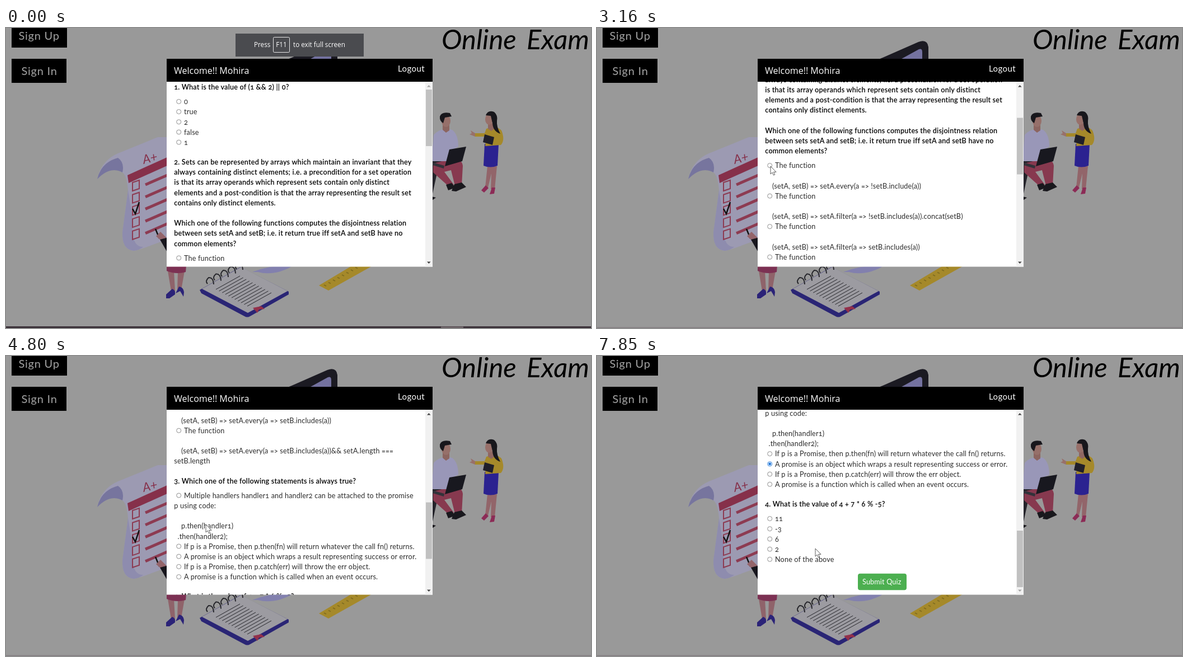
Recreate the animation shown at these times as an HTML page. Size 1045x536 px, loop 8000 ms.

```html
<!DOCTYPE html>
<html lang="en">
<head>
<meta charset="utf-8">
<title>Online Exam</title>
<style>
html, body { margin: 0; height: 100%; overflow: hidden; background: #999; }
svg { display: block; }
#stage { width: 100vw; height: 100vh; }
text { font-family: Lato, sans-serif; white-space: pre; }
.menu { font-size: 20px; letter-spacing: .75px; fill: #a2a2a2; }
.title { font-size: 49px; font-style: italic; }
.ui { font-family: "Open Sans", "Noto Sans", sans-serif; fill: #fff; }
.line { font-size: 12.6px; letter-spacing: .18px; fill: #2b2b2b; font-variant-numeric: oldstyle-nums; }
.q { font-weight: 600; letter-spacing: .22px; fill: #000; }
</style>
</head>
<body>
<svg id="stage" viewBox="0 0 1045 536" preserveAspectRatio="none">
  <rect width="1045" height="536" fill="#999"/>

  <!-- monitor corner -->
  <path d="M494 60L574 25Q590 19 592 34V60Z" fill="#1b1a22"/>
  <path d="M535 60L575 38Q581 36 581 43V60Z" fill="#7472a0"/>

  <!-- exam paper -->
  <path d="M290 195H271L200 224Q170 237 163 270Q185 245 208 258Q216 264 218 290L208 365Q207 396 228 398Q238 397 260 388L290 377Z" fill="#9c9ab2"/>
  <path d="M163 270Q170 240 200 232Q212 240 208 258Q186 246 163 270Z" fill="#77759e"/>
  <path d="M208 365Q207 396 228 398Q238 397 245 391Q222 392 226 340L218 290Z" fill="#8e8cae"/>
  <path d="M217 263L290 230V245L219 277Z" fill="#86304a"/>
  <text x="246" y="243" transform="rotate(-14 246 243)" font-size="22" font-style="italic" fill="#86304a">A+</text>
  <g id="rows" fill="none" stroke="#8d3b52"></g>
  <path d="M226 323L231 332L238 311" fill="none" stroke="#111" stroke-width="2.5"/>
  <path d="M267 359L274 376" stroke="#111" stroke-width="2.5"/>
  <path d="M268 372L276 364L290 378V391Z" fill="#94646a"/>
  <path d="M275 378L290 374V404Z" fill="#17161d"/>

  <!-- legs -->
  <path d="M289 434H300L302 470H295ZM307 434H319L313 468H306Z" fill="#8f636a"/>
  <path d="M287 424H322L321 436Q304 441 287 434Z" fill="#7c3153"/>
  <path d="M286 476L297 466Q303 468 302 476L292 483H286ZM303 474L309 462Q317 463 318 472L317 480L311 470Z" fill="#2b2378"/>

  <!-- notebook -->
  <path d="M440 436Q470 424 505 424Q520 424 490 435Q468 441 450 436Z" fill="#8280ae"/>
  <path d="M346 468L419 427L505 471V476L436 515Q431 518 426 515L349 474Z" fill="#2a2575"/>
  <path d="M350 466L420 427L503 470L432 509Z" fill="#9c9ba1"/>
  <path d="M441 500L456 497L462 502L452 503L449 509Z" fill="#93304a"/>
  <g id="book" fill="none" stroke="#26262b"></g>

  <!-- ruler -->
  <path d="M559 460L621 423H658L576 469Z" fill="#a5892a"/>
  <g id="ticks" stroke="#7d6a20"></g>

  <!-- seated figure -->
  <path d="M755 232H782L772 250L762 296H755Z" fill="#25242b"/>
  <path d="M760 301L768 303L761 308Z" fill="#17161b"/>
  <path d="M763 242L795 234Q814 232 816 246L814 282H802L795 254L783 257L800 280L792 284L763 258Z" fill="#87394f"/>
  <path d="M764 191Q776 177 797 182Q808 190 808 212L792 220L789 238H760Z" fill="#9997b8"/>
  <path d="M780 172H792V183L786 187L780 182Z" fill="#8c6560"/>
  <ellipse cx="786" cy="166" rx="8" ry="11" fill="#96706a"/>
  <path d="M775 158Q778 149 793 152L796 158L784 160L781 170Q774 166 775 158Z" fill="#18171c"/>
  <path d="M792 217L822 212L815 238L784 247Z" fill="#18181f"/>
  <path d="M783 246L762 240V245L782 251Z" fill="#32323a"/>
  <path d="M801 279L814 276L822 284L804 292L796 291ZM786 280L796 277L803 285L790 290Z" fill="#19181d"/>

  <!-- standing figure -->
  <path d="M860 247H877L873 288H866L867 260L861 285H856Z" fill="#92656a"/>
  <path d="M849 290L857 281L862 286L854 294ZM864 297L868 285H874L872 296Z" fill="#8c2b56"/>
  <path d="M855 207H880L878 246Q865 251 853 246Z" fill="#2b2290"/>
  <path d="M858 180Q875 173 885 183Q892 200 884 209L856 211L857 194L838 194L836 188L855 188Z" fill="#a5892a"/>
  <path d="M838 188L830 183L832 188L828 190L838 194Z" fill="#98706a"/>
  <path d="M861 170H872V180L867 184L861 180Z" fill="#8f6762"/>
  <ellipse cx="863" cy="163" rx="7" ry="10" fill="#98706a"/>
  <path d="M857 156Q861 146 872 150Q879 156 877 166Q876 176 883 189Q870 185 869 170L866 157Z" fill="#18171c"/>
  <path d="M855 190L872 195L869 209L852 204Z" fill="#201f29"/>

  <!-- page buttons and heading -->
  <path d="M10 0H109V35H10ZM10 55H108V98H10Z"/>
  <text class="menu" x="22.5" y="21">Sign Up</text>
  <text class="menu" x="27.5" y="84">Sign In</text>
  <text class="title" y="38"><tspan x="778">Online</tspan> <tspan x="930">Exam</tspan></text>

  <rect y="534.5" width="1045" height="1.5" fill="#857f82"/>
  <g id="strip">
    <rect y="533" width="1045" height="3" fill="#3b3038"/>
    <rect x="777" y="533.5" width="40" height="2.5" fill="#6e6569"/>
  </g>

  <g id="toast">
    <rect x="410" y="10" width="229" height="41" fill="#4a4b4f"/>
    <rect x="477.5" y="16.5" width="29" height="27" rx="2" fill="none" stroke="#e8e8e8"/>
    <g font-size="11.7">
      <text class="ui" x="443" y="34">Press</text>
      <text class="ui" x="492" y="34" text-anchor="middle">F11</text>
      <text class="ui" x="513" y="34">to exit full screen</text>
    </g>
  </g>

  <!-- dialog -->
  <rect x="287" y="55" width="475" height="371.5" fill="#fff"/>
  <rect x="287" y="55" width="475" height="41"/>
  <text class="ui" x="300" y="82" font-size="16">Welcome!! Mohira</text>
  <text x="700" y="77.5" font-size="15" letter-spacing=".4" fill="#fff">Logout</text>
  <svg x="287" y="96" width="462" height="330.5" viewBox="287 96 462 330.5"><g id="quiz"></g></svg>
  <rect x="749" y="96" width="13" height="330.5" fill="#f1f1f1"/>
  <rect id="thumb" x="750" y="110" width="11" height="101" fill="#c1c1c1"/>
  <path id="up" d="M752 105.5L755.3 102L758.6 105.5Z"/>
  <path id="down" d="M752 417.5L755.3 421L758.6 417.5Z"/>

  <circle id="glow" r="10" fill="#fff000" fill-opacity=".72"/>
  <path id="arrow" d="M0 0V14L3.2 11.1L5.4 16L7.7 15L5.5 10.3H10Z" fill="#fff" stroke="#333" stroke-width=".8"/>
</svg>

<script>
const $ = id => document.getElementById(id);
function add(parent, tag, attrs, text) {
  const el = document.createElementNS("http://www.w3.org/2000/svg", tag);
  for (const k in attrs) el.setAttribute(k, attrs[k]);
  if (text) el.textContent = text;
  return parent.appendChild(el);
}
const stroke = (parent, d, w) => add(parent, "path", { d, "stroke-width": w });

for (let i = 0; i < 5; i++) {
  const y = 282 + i * 21.7;
  stroke($("rows"), `M226 ${y - 6}L238 ${y - 10}V${y + 5}L226 ${y + 9}Z`, 2);
  stroke($("rows"), `M249 ${y - 2}L288 ${y - 19}`, 5);
}
for (let i = 0; i < 11; i++)
  stroke($("book"), `M${375 + i * 5.6} ${467 + i * 3}L${418 + i * 5.6} ${443 + i * 3}`, 1);
for (let i = 0; i < 5; i++) {
  const x = 362 + i * 13, y = 455 - i * 6.5;
  stroke($("book"), `M${x + 9} ${y + 3}Q${x + 8} ${y - 10} ${x} ${y - 9}Q${x - 7} ${y - 3} ${x - 2} ${y + 2}`, 2);
}
for (let i = 0; i < 9; i++)
  stroke($("ticks"), `M${568 + i * 8} ${459 - i * 4.5}l4 2`, 1.5);

// First letter: q question, o option, c code, d dotted code, p plain, - blank
const lines = `q1. What is the value of (1 && 2) || 0?
o0
otrue
o2
ofalse
o1
q2. Sets can be represented by arrays which maintain an invariant that they
qalways containing distinct elements; i.e. a precondition for a set operation
qis that its array operands which represent sets contain only distinct
qelements and a post-condition is that the array representing the result set
qcontains only distinct elements.
q
qWhich one of the following functions computes the disjointness relation
qbetween sets setA and setB; i.e. it return true iff setA and setB have no
qcommon elements?
oThe function
-
c(setA, setB) => setA.every(a => !setB.include(a))
oThe function
-
c(setA, setB) => setA.filter(a => !setB.includes(a)).concat(setB)
oThe function
-
c(setA, setB) => setA.filter(a => setB.includes(a))
oThe function
-
c(setA, setB) => setA.every(a => setB.includes(a))
oThe function
-
c(setA, setB) => setA.every(a => setB.includes(a))&& setA.length ===
psetB.length
q3. Which one of the following statements is always true?
oMultiple handlers handler1 and handler2 can be attached to the promise
pp using code:
-
cp.then(handler1)
d.then(handler2);
oIf p is a Promise, then p.then(fn) will return whatever the call fn() returns.
oA promise is an object which wraps a result representing success or error.
oIf p is a Promise, then p.catch(err) will throw the err object.
oA promise is a function which is called when an event occurs.
q4. What is the value of 4 + 7 * 6 % -5?
o11
o-3
o6
o2
oNone of the above`.split("\n");

const left = { q: 300.3, o: 318, c: 313, d: 306.5, p: 300.3 };
const quiz = $("quiz"), radios = [];
let y = 110 - 18.18, last = "q";
for (const line of lines) {
  const kind = line[0];
  y += 18.18;
  if (kind === "o" && last === "q") y += 8;
  if (kind === "q" && last !== "q") y += 17;
  last = kind;
  if (kind === "o") {
    const at = { cx: 308.7, cy: y - 4.8 };
    radios.push([
      add(quiz, "circle", { ...at, r: 4, fill: "#fff", stroke: "#808080", "stroke-width": .9 }),
      add(quiz, "circle", { ...at, r: 2.4, fill: "#1a73d8" })
    ]);
  }
  if (line.length > 1 && kind !== "-")
    add(quiz, "text", { class: "line " + kind, x: left[kind], y }, line.slice(1));
}
add(quiz, "rect", { x: 466, y: 1050, width: 87, height: 29.5, rx: 4, fill: "#4caf50" });
add(quiz, "text", { class: "line", x: 474, y: 1068.8, style: "fill:#fff" }, "Submit Quiz");

const clamp = v => Math.min(1, Math.max(0, v));
const span = (t, a, b) => clamp((t - a) / (b - a));
const ease = v => v * v * (3 - 2 * v);

const wheel = [[2150, 2430], [3600, 3850], [4330, 4630], [7520, 7830]];
const clicks = [[1430, 1700], [3320, 3390], [6750, 6830]];
const picked = [[2, 1700], [5, 3390], [12, 6830]];
const path = [
  [300, 420, 300], [880, 300, 166], [970, 297, 164], [1270, 306.5, 169.5], [1760, 306.5, 169.5],
  [2150, 352, 262], [2460, 357, 267], [2610, 357, 267], [3160, 310, 247], [3560, 310, 247],
  [3840, 342, 283], [4320, 357, 301], [4800, 357, 301], [5200, 308, 247], [5590, 312, 357],
  [6050, 308, 246], [6440, 300, 355], [6520, 307.5, 356.5], [6900, 307.5, 356.5],
  [7090, 345, 335], [7210, 382, 344], [7530, 385, 344], [7850, 390, 344]
];

function pointer(t) {
  const i = path.findIndex(p => p[0] > t);
  if (i < 0) return path[path.length - 1].slice(1);
  if (i === 0) return path[0].slice(1);
  const [a, b] = [path[i - 1], path[i]], k = span(t, a[0], b[0]);
  return [1, 2].map(j => a[j] + (b[j] - a[j]) * k);
}

function draw(now) {
  const t = now % 8000;
  const turns = wheel.reduce((s, [a, b]) => s + ease(span(t, a, b)), 0);
  quiz.setAttribute("transform", `translate(0 ${-165.3 * turns})`);
  $("thumb").setAttribute("y", 110 + 50.5 * turns);
  $("up").setAttribute("fill", turns > 0 ? "#404040" : "#a3a3a3");
  $("down").setAttribute("fill", turns < 4 ? "#404040" : "#a3a3a3");

  $("toast").setAttribute("opacity", 1 - span(t, 100, 600));
  $("strip").setAttribute("opacity", 1 - span(t, 100, 880) / 2 - span(t, 1400, 1530) / 2);

  for (const [i, at] of picked) radios[i][0].setAttribute("stroke", t >= at ? "#1a73d8" : "#808080");
  radios.forEach(([, dot], i) =>
    dot.setAttribute("opacity", picked.some(([n, at]) => n === i && t >= at) ? 1 : 0));

  const place = `translate(${pointer(t)})`;
  $("arrow").setAttribute("transform", place);
  $("arrow").setAttribute("opacity", t < 300 ? 0 : 1);
  $("glow").setAttribute("transform", place);
  $("glow").setAttribute("opacity", clicks.some(([a, b]) => t >= a && t < b) ? 1 : 0);
}

let start;
function tick(now) {
  start ??= now;
  draw(now - start);
  requestAnimationFrame(tick);
}
draw(0);
requestAnimationFrame(tick);
</script>
</body>
</html>
```
